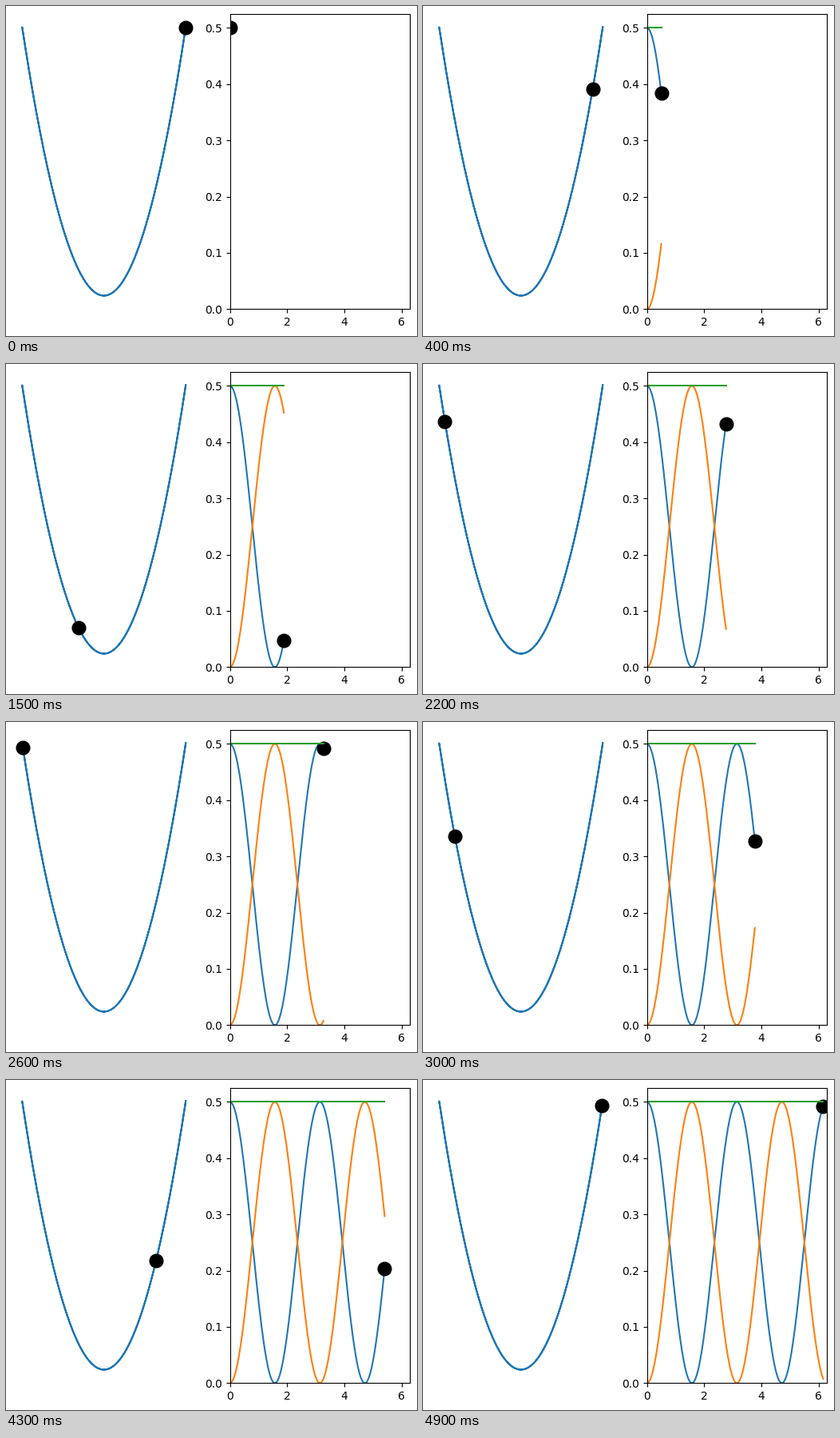
A matplotlib script that plays this animation: 515 by 413 pixels, repeating every 5 s.

```python
import numpy as np
import matplotlib.pyplot as plt
from matplotlib.animation import FuncAnimation

WIDTH, HEIGHT, DPI = 515, 413, 100
FRAMES, SUBSTEPS = 50, 10

plt.rcParams["font.family"] = "DejaVu Sans"

time = np.linspace(0, 2 * np.pi, FRAMES * SUBSTEPS + 1)
position = np.cos(time)
potential = 0.5 * position**2
kinetic = 0.5 * np.sin(time) ** 2
total = potential + kinetic

fig = plt.figure(figsize=(WIDTH / DPI, HEIGHT / DPI), dpi=DPI)


def add_panel(left, top=9.7, width=225.45, height=369.6):
    """Add axes placed in pixels from the top left corner."""
    return fig.add_axes([left / WIDTH, 1 - (top + height) / HEIGHT,
                         width / WIDTH, height / HEIGHT])


def add_ball(ax):
    return ax.plot([], [], "ko", markersize=12)[0]


well = add_panel(10)
well.plot(position, potential)
well.set(xlim=(-1.1, 1.1), ylim=(-0.025, 0.525))
well.axis("off")
well_ball = add_ball(well)

chart = add_panel(280.55)
chart.set(xlim=(0, 2 * np.pi), ylim=(0, 0.525))
potential_line, = chart.plot([], [], "C0")
chart_ball = add_ball(chart)
kinetic_line, = chart.plot([], [], "C1")
total_line, = chart.plot([], [], "C2")

traces = [(potential_line, potential), (kinetic_line, kinetic),
          (total_line, total)]


def update(frame):
    now = frame * SUBSTEPS
    well_ball.set_data([position[now]], [potential[now]])
    chart_ball.set_data([time[now]], [potential[now]])
    for line, energy in traces:
        line.set_data(time[:now + 1], energy[:now + 1])
    return [well_ball, chart_ball] + [line for line, _ in traces]


animation = FuncAnimation(fig, update, frames=FRAMES, interval=100,
                          repeat=True, repeat_delay=0)
plt.show()
```
